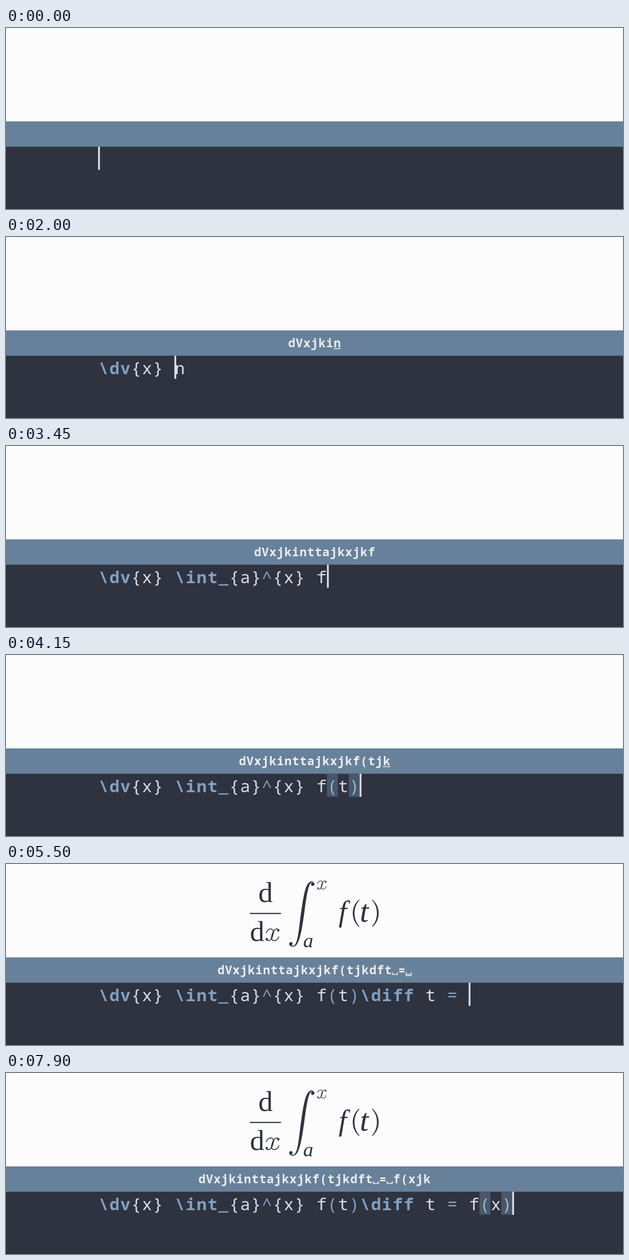
Write an HTML page that moves like this. It is 1280 by 376 pixels and loops after 8000 ms.

```html
<!DOCTYPE html>
<html lang="en">
<head>
<meta charset="utf-8">
<title>Typing LaTeX</title>
<style>
  html, body { margin: 0; width: 100%; height: 100%; overflow: hidden; background: #fcfcfd; }
  svg { display: block; width: 1280px; height: 376px; }
  #code, #keys { font-family: "Noto Sans Mono", "DejaVu Sans Mono", monospace; text-anchor: middle; }
  #code { font-size: 34.6px; fill: #d8dee9; }
  #code .op { fill: #81a1c1; }
  #code .cmd { fill: #81a1c1; font-weight: 600; }
  #code .match { fill: #88c0d0; }
  #keys { font-size: 24.1px; font-weight: 700; fill: #eceff4; }
  #math { font-family: "Liberation Serif", serif; font-size: 60px; fill: #2e3440; stroke: none; }
  #math .it { font-style: italic; }
  .thin { fill: none; stroke: #2e3440; stroke-width: 1.7; stroke-linecap: round; }
  .stem { fill: none; stroke: #2e3440; stroke-width: 3.4; stroke-linecap: round; }
</style>
</head>
<body>
<svg viewBox="0 0 1280 376">
  <defs>
    <g id="x">
      <path class="thin" d="M2 9C4 3 8 .8 11 .8C15 .8 17.5 4 16.5 8L13 19C12 23 9 25.2 6 25.2C4 25.2 2 24.5 2 22.5M28 4C27.5 1.5 25.5 .8 24 .8C20.5 .8 18 4 17 7.5L13 19C12.3 22.5 14.5 25.2 18.5 25.2C23 25.2 26.5 22 28 17"/>
      <path class="stem" d="M16.4 8L13.2 19"/>
      <circle cx="27" cy="4" r="2.4"/><circle cx="3" cy="22" r="2.4"/>
    </g>
  </defs>
  <rect width="1280" height="376" fill="#fcfcfd"/>
  <rect y="194" width="1280" height="53" fill="#68819a"/>
  <rect y="246.6" width="1280" height="130" fill="#2f3340"/>

  <g id="math" visibility="hidden">
    <text x="523.5" y="79">d</text>
    <rect x="506" y="101.6" width="64.5" height="2.4"/>
    <text x="506" y="160">d</text>
    <use href="#x" x="538" y="134"/>
    <path d="M596 170C607 168 608 125 613 95C618 62 622 38 633 36.5L634 38.5C627 40 623 70 619 100C614 135 609 172 596 171.5Z"/>
    <path class="thin" d="M597 170.7C592 171.2 589 169 588.5 166M632 37.3C636 36.6 638.5 39 639 41.5"/>
    <circle cx="591" cy="165.6" r="3.4"/><circle cx="636.3" cy="42" r="3.4"/>
    <use href="#x" transform="translate(645 34.5) scale(.68 .71)"/>
    <text class="it" x="616.5" y="172.6" font-size="42">a</text>
    <text class="it" x="690" y="118.5" font-size="61">f</text>
    <path d="M732.5 74C715 88 715 116 732.5 131L733.4 130C719.5 115 719.5 89 733.4 75Z"/>
    <text class="it" x="734" y="120" font-size="66">t</text>
    <path d="M760 74C777.5 88 777.5 116 760 131L759.1 130C773 115 773 89 759.1 75Z"/>
  </g>

  <g id="keys"></g>
  <rect id="line" y="231" height="1.6" fill="#eceff4"/>
  <g id="code"></g>
  <rect id="caret" y="246.6" width="3.8" height="48" fill="#d8dee9"/>
</svg>
<script>
const LOOP = 8000, MATH_AT = 5500;
const LEFT = 191, COL = 22.61, KEY = 15.75, BLANK = 13;

// [time, key, columns to hop over, text to insert with | as caret]; no hop means the key is pending
const strokes = [
  [50, 'd'], [950, 'V', 0, '\\dv{|}'], [1350, 'x', 0, 'x'],
  [1550, 'j'], [1650, 'k', 1, ' '],
  [1850, 'i'], [1950, 'n'], [2050, 't'], [2150, 't', 0, '\\int_{|}^{}'],
  [2300, 'a', 0, 'a'], [2400, 'j'], [2500, 'k', 3, ''],
  [2750, 'x', 0, 'x'], [2850, 'j'], [2950, 'k', 1, ' '],
  [3200, 'f', 0, 'f'], [3500, '(', 0, '(|)'], [3700, 't', 0, 't'],
  [3900, 'j'], [4000, 'k', 1, ''],
  [4350, 'd'], [4500, 'f', 0, '\\diff '], [4700, 't', 0, 't'],
  [5100, '␣', 0, ' '], [5250, '=', 0, '='], [5400, '␣', 0, ' '],
  [5600, 'f', 0, 'f'], [5750, '(', 0, '(|)'], [5950, 'x', 0, 'x'],
  [6040, 'j'], [6150, 'k', 1, '']
];

const states = [{ time: -Infinity, text: '', caret: 0, keys: '', pending: '' }];
for (const [time, key, hop, insert] of strokes) {
  let { text, caret, keys } = states[states.length - 1];
  keys += key;
  if (hop === undefined) {
    states.push({ time, text, caret, keys, pending: key });
    continue;
  }
  caret += hop;
  const [before, after = ''] = insert.split('|');
  text = text.slice(0, caret) + before + after + text.slice(caret);
  caret += before.length;
  states.push({ time, text, caret, keys, pending: '' });
}

const $ = id => document.getElementById(id);
const code = $('code'), keyRow = $('keys'), line = $('line'), caretBox = $('caret'), math = $('math');

function add(parent, tag, attrs, content) {
  const el = document.createElementNS('http://www.w3.org/2000/svg', tag);
  for (const name in attrs) el.setAttribute(name, attrs[name]);
  if (content) el.textContent = content;
  parent.append(el);
}

// Columns of the bracket at the caret, or just before it, and of its partner
function matching(text, caret) {
  const isBracket = i => i >= 0 && i < text.length && '(){}'.includes(text[i]);
  const at = [caret, caret - 1].find(isBracket);
  if (at === undefined) return [];
  const step = '({'.includes(text[at]) ? 1 : -1;
  let depth = 0;
  for (let i = at; i >= 0 && i < text.length; i += step) {
    if ('({'.includes(text[i])) depth += step;
    if (')}'.includes(text[i])) depth -= step;
    if (depth === 0) return [at, i];
  }
  return [];
}

function drawCode({ text, caret, pending }) {
  code.replaceChildren();
  const styles = [...text].map(c => '_^()='.includes(c) ? 'op' : '');
  for (const m of text.matchAll(/\\\w[a-z]*/g)) styles.fill('cmd', m.index, m.index + m[0].length);
  for (const i of matching(text, caret)) styles[i] = 'match';

  const chars = [...text];
  if (pending) {
    chars[caret] = pending;
    styles[caret] = '';
  }
  chars.forEach((c, i) => {
    const x = LEFT + i * COL;
    if (styles[i] === 'match')
      add(code, 'rect', { x, y: 246.6, width: COL, height: 48, fill: '#4c566a' });
    if (c !== ' ')
      add(code, 'text', { x: x + COL / 2, y: 284.5, class: styles[i] }, c);
  });
  caretBox.setAttribute('x', LEFT + caret * COL);
}

function drawKeys({ keys }) {
  keyRow.replaceChildren();
  const widths = [...keys].map(c => c === '␣' ? BLANK : KEY);
  let x = 640 - widths.reduce((a, b) => a + b, 0) / 2;
  [...keys].forEach((c, i) => {
    const w = widths[i];
    if (c === '␣')
      add(keyRow, 'path', { d: `M${x + 1.2} 225v4.3h${w - 2.4}v-4.3`, fill: 'none', stroke: '#eceff4', 'stroke-width': 1.8 });
    else
      add(keyRow, 'text', { x: x + w / 2, y: 229 }, c);
    line.setAttribute('x', x);
    line.setAttribute('width', w);
    x += w;
  });
}

let shown;
function frame() {
  const t = performance.now() % LOOP;
  const state = states.findLast(s => s.time <= t);
  if (state !== shown) {
    drawCode(state);
    drawKeys(state);
    shown = state;
  }
  const age = t - state.time;
  line.setAttribute('opacity', Math.max(0, Math.min(1, (250 - age) / 100)));
  math.setAttribute('visibility', t >= MATH_AT ? 'visible' : 'hidden');
  requestAnimationFrame(frame);
}
frame();
</script>
</body>
</html>
```
